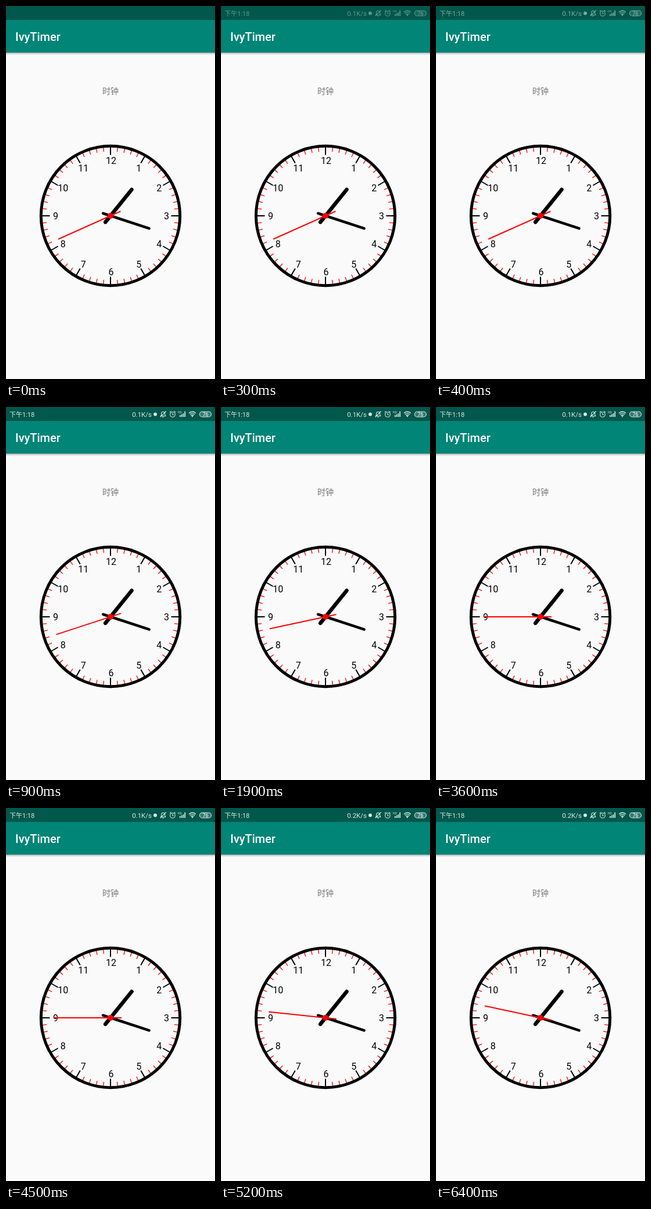
Recreate the animation shown at these times as an HTML page. Size 360 by 640 pixels, loop 6.5 s.

```html
<!DOCTYPE html>
<html lang="zh-CN">
<head>
<meta charset="utf-8">
<style>
html, body { margin: 0; width: 100%; height: 100%; overflow: hidden; background: #fafafa; }
svg { display: block; width: 360px; height: 640px; font-family: Roboto, "Noto Sans CJK SC", "Noto Sans CJK", sans-serif; }
.line { fill: none; stroke: #dce8e6; stroke-width: 1.1; stroke-linecap: round; stroke-linejoin: round; }
.round { stroke: #000; stroke-linecap: round; }
</style>
</head>
<body>
<svg viewBox="0 0 360 640">
  <defs>
    <linearGradient id="shade" x2="0" y2="1">
      <stop stop-color="#000" stop-opacity=".28"/>
      <stop offset="1" stop-color="#000" stop-opacity="0"/>
    </linearGradient>
  </defs>
  <rect width="360" height="640" fill="#fafafa"/>
  <rect y="80" width="360" height="4" fill="url(#shade)"/>
  <rect width="360" height="80" fill="#008577"/>
  <rect width="360" height="24" fill="#00574b"/>
  <text x="16" y="60" font-size="20" font-weight="500" fill="#fff">IvyTimer</text>
  <text x="180" y="151" font-size="14" text-anchor="middle" fill="#757575">时钟</text>

  <g id="status" fill="#dce8e6">
    <text x="6" y="17" font-size="11">下午1:18</text>
    <text id="speed" x="251" y="17" font-size="11.5" text-anchor="end"></text>
    <circle cx="257" cy="12.5" r="3"/>
    <g class="line">
      <path d="M266.5 15.5h8.5l-1.3-2v-2.3a3 3 0 0 0-6 0v2.3zM269.5 17.3h2M266 17l9.5-9.5"/>
      <circle cx="287" cy="13" r="4.3"/>
      <path d="M287 10.7v2.5h1.8M282.3 9l2-1.7M291.7 9l-2-1.7"/>
      <path d="M315.5 10.2q5.5-4.5 11 0M317.3 12.4q3.7-3 7.4 0M319 14.5q2-1.5 4 0" stroke-width="1.4"/>
      <rect x="333.5" y="8" width="20" height="9" rx="4.5" fill="#dce8e6" fill-opacity=".25"/>
    </g>
    <path d="M299 14h1.7v3h-1.7zM301.8 12.5h1.7v4.5h-1.7zM304.6 11h1.7v6h-1.7zM307.4 7.5h1.7v9.5h-1.7z"/>
    <text x="296" y="10.5" font-size="5">HD</text>
    <circle cx="321" cy="16.2" r="1.1"/>
    <path id="traffic" d="M325 14.5h3.5l-1.75 3z"/>
    <text x="343.5" y="15.7" font-size="8.5" font-weight="500" text-anchor="middle">76</text>
  </g>

  <g transform="translate(180 360)">
    <g id="dial"></g>
    <circle r="119.7" fill="none" stroke="#000" stroke-width="5"/>
    <path class="round" d="M0 14V-58" stroke-width="6.5" transform="rotate(39)"/>
    <path class="round" d="M0 13.5V-70" stroke-width="4.7" transform="rotate(108)"/>
    <path id="second" d="M0 19V-98.3" stroke="#f00" stroke-width="2"/>
    <circle r="5" fill="#f00"/>
  </g>
</svg>
<script>
const $ = id => document.getElementById(id);
const LOOP = 6500;

let dial = "";
for (let i = 0; i < 60; i++) {
  const major = i % 5 === 0;
  dial += `<path d="M0-118V${major ? -104.5 : -110.5}" stroke="${major ? "#000" : "#f00"}"
    stroke-width="${major ? 2 : 1.3}" transform="rotate(${i * 6})"/>`;
}
for (let h = 1; h <= 12; h++) {
  const a = h * Math.PI / 6;
  dial += `<text x="${1 + 95.5 * Math.sin(a)}" y="${6.2 - 95.5 * Math.cos(a)}"
    font-size="16" text-anchor="middle">${h}</text>`;
}
$("dial").innerHTML = dial;

function draw(t) {
  // The hand ticks once a second, first at 600 ms.
  const sec = 41 + Math.floor((t + 400) / 1000);
  $("second").setAttribute("transform", `rotate(${sec * 6})`);
  $("status").setAttribute("opacity", Math.min(1, Math.floor(t / 100) / 7));
  $("speed").textContent = t < 4600 ? "0.1K/s" : "0.2K/s";
  const busy = t >= 2200 && t < 3200 || t >= 5300 && t < 6100;
  $("traffic").setAttribute("opacity", busy ? 1 : 0);
}

const start = performance.now();
function frame() {
  draw((performance.now() - start) % LOOP);
  requestAnimationFrame(frame);
}
frame();
</script>
</body>
</html>
```
